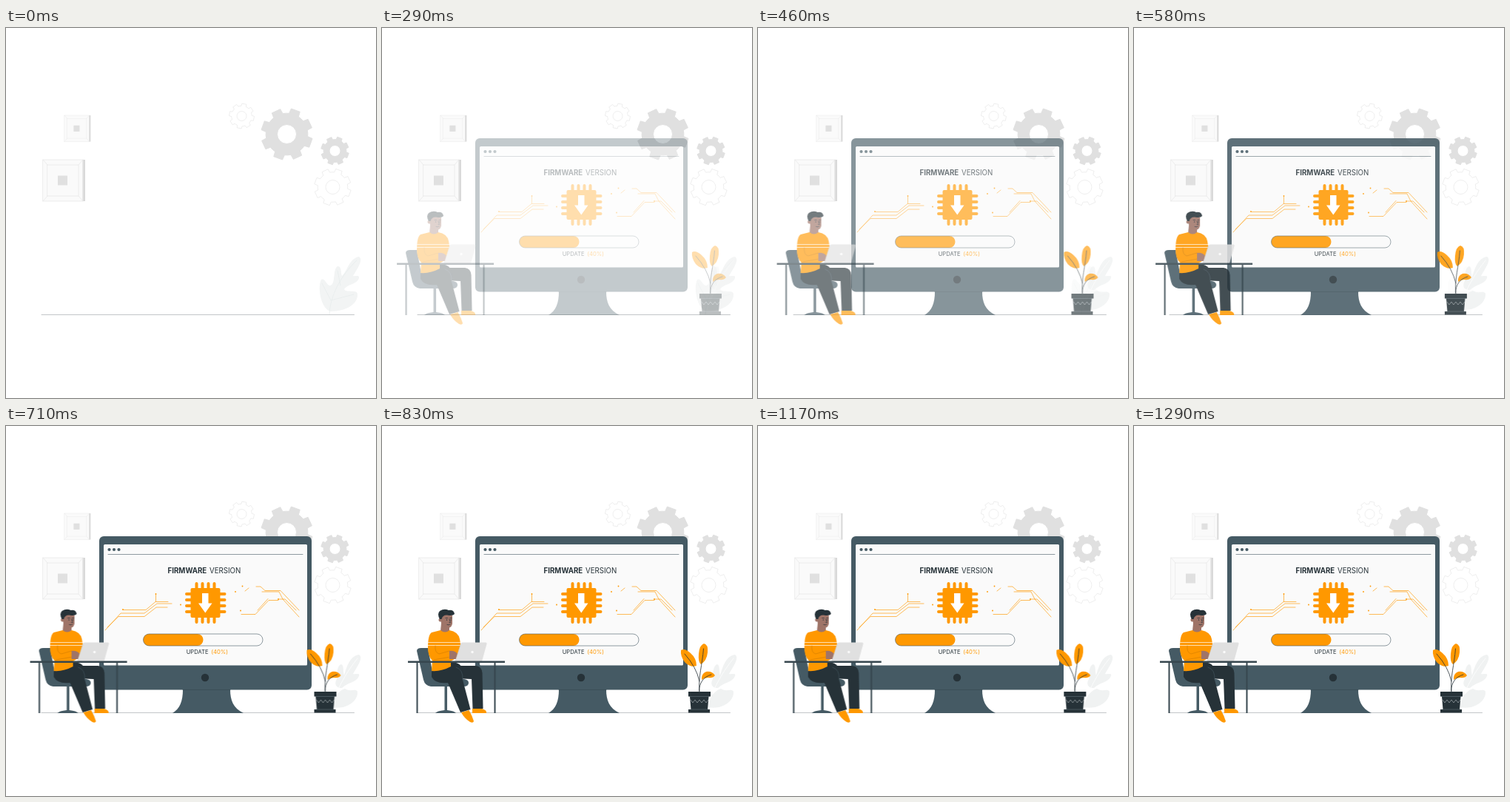
An HTML page that plays this animation: 500x500 px, repeating every 1.33 s.

```html
<!DOCTYPE html>
<html lang="en">
<head>
<meta charset="utf-8">
<title>Firmware update</title>
<style>
  html, body { margin: 0; width: 100%; height: 100%; overflow: hidden; background: #fff; }
  svg { display: block; width: 100%; height: 100%; }
  text { font-family: Inter, sans-serif; fill: #263238; }

  .fade { animation: fade 1330ms linear infinite; }
  .out { animation: fade 1330ms linear infinite, out 1330ms linear infinite; }
  .slide { animation: fade 1330ms linear infinite, slide 1330ms linear infinite; }
  .man { --side: 1px; }
  .plant { --side: -1px; }

  @keyframes fade {
    0%, 9.2% { opacity: 0; }
    49%, 100% { opacity: 1; }
  }
  @keyframes out {
    0%, 9.2% { opacity: 1; }
    49%, 100% { opacity: 0; }
  }
  @keyframes slide {
    0%, 9.4% {
      transform: translateX(calc(var(--side) * -20));
      animation-timing-function: cubic-bezier(.33, .38, .67, .93);
    }
    75% {
      transform: translateX(calc(var(--side) * 2));
      animation-timing-function: ease-in-out;
    }
    97%, 100% { transform: none; }
  }

  .line { fill: none; stroke-linecap: round; stroke-linejoin: round; }
  .dark { fill: #263238; }
  .slate { fill: #455a64; }
  .orange { fill: #ff9800; }
  .skin { fill: #9f7468; }
</style>
</head>
<body>
<svg viewBox="0 0 500 500">
  <defs>
    <g id="frame">
      <path fill="#fafafa" d="M0 0H54V56H0Z"/>
      <path fill="#d9d9d9" d="M53.5 0H57V56H53.5Z"/>
      <path class="line" stroke="#e9e9e9" stroke-width=".8"
        d="M0 0H54V56H0ZM6 7H48V49H6ZM0 0L6 7M54 0L48 7M0 56L6 49M54 56L48 49"/>
      <path fill="#e0e0e0" d="M20 21.5H33V34.5H20Z"/>
    </g>
  </defs>

  <!-- wall and floor -->
  <use href="#frame" transform="translate(50 178)"/>
  <use href="#frame" transform="translate(79 118) scale(.62 .635)"/>
  <g id="gears"></g>
  <g class="out">
    <path fill="#f2f4f4" d="M438 383C424 377 421 348 426 340C431 337 433 348 438 348C446 347 441 326 448 322C454 321 452 331 454 335C461 329 464 311 477 309C483 313 476 323 469 335C472 336 478 333 477 338C474 347 463 345 457 353C459 358 474 353 475 359C476 371 463 383 438 383Z"/>
    <path class="line" stroke="#e6ebeb" stroke-width=".7" d="M437 387C438 362 452 335 474 314M448 328L452 348M427 345L439 368M439 368L470 360"/>
  </g>
  <g class="fade" fill="#f0f2f2">
    <path d="M457 337C460 327 464 311 477 309C483 313 476 323 469 335C472 336 479 333 477 338C473 347 462 346 454 354C446 355 443 348 447 342C447 332 448 323 453 322C457 323 455 331 457 337Z"/>
    <path d="M440 380C440 369 450 357 458 355C466 360 472 354 475 359C476 371 461 384 440 380Z"/>
    <path class="line" stroke="#fff" stroke-width=".7" d="M439 382C445 360 458 335 475 314"/>
  </g>
  <path class="line" stroke="#b4b8ba" stroke-width=".8" d="M48 387.5H470.5"/>

  <!-- monitor -->
  <g class="fade">
    <path class="slate" d="M239 356C239 372 235 382 225 388H321C307 381 303 371 303 356Z"/>
    <rect class="slate" x="126" y="149" width="287" height="207.5" rx="6"/>
    <path class="line" stroke="#37474f" stroke-width=".6" d="M239 356.5H303"/>
    <rect x="132" y="160" width="275" height="163.5" rx="1.5" fill="#fafafa"/>
    <g class="slate">
      <circle cx="139.5" cy="167" r="2.1"/>
      <circle cx="146" cy="167" r="2.1"/>
      <circle cx="152.5" cy="167" r="2.1"/>
    </g>
    <path class="line" stroke="#455a64" stroke-width=".6" d="M138 173.5H401"/>
    <circle class="dark" cx="269" cy="340" r="5.2"/>

    <text x="218.6" y="199" font-size="9.7" font-weight="700">FIRMWARE</text>
    <text x="275" y="199" font-size="9.7">VERSION</text>
    <text x="243.7" y="308" font-size="7.6">UPDATE</text>
    <text x="277.3" y="308" font-size="7.6" style="fill:#ff9800">(40%)</text>

    <!-- chip -->
    <path class="line" stroke="#ff9800" stroke-width="4"
      d="M257.5 213V265M265.5 213V265M273.5 213V265M281.5 213V265M244 227H295.500M244 235H295.500M244 243H295.500M244 251H295.500"/>
    <rect class="orange" x="249.5" y="219" width="40" height="40" rx="2"/>
    <path fill="#fff" d="M265 226H273.500V239.500H278.500L269.300 252.500L260 239.500H265Z"/>

    <!-- circuits -->
    <g class="line" stroke="#ff9800" stroke-width=".65">
      <path d="M158 248.500H189L202 237.500H219M202.500 227V237M134 276L155 253H187L204 240H224M137 272L152 257.500H187L203 245H218"/>
      <path d="M338 217H344L350 222.500H371L396 249M323 223L328 219M346 224H369L374 234L396 258M318 254.500H337L355 235.500H368M340 249L354 233.500M368 234H377L392 249"/>
    </g>
    <g class="orange">
      <circle cx="158" cy="248" r=".9"/>
      <circle cx="202.500" cy="227" r=".9"/>
      <circle cx="236" cy="241.500" r=".9"/>
      <circle cx="319.500" cy="216.500" r=".9"/>
      <circle cx="310" cy="224" r=".9"/>
      <circle cx="317" cy="249.500" r=".9"/>
      <circle cx="368" cy="234" r=".9"/>
    </g>

    <!-- progress -->
    <rect class="orange" x="185.500" y="281" width="81" height="16" rx="8"/>
    <rect x="185.500" y="281" width="161.500" height="16" rx="8" fill="none" stroke="#455a64" stroke-width=".6"/>
  </g>

  <!-- man at the desk -->
  <g class="slide man">
    <path class="slate" d="M47 304Q47 300 53 300H62L70 342H111Q117 343 117 347Q117 352 110 352H66Q58 351 56 343Z"/>
    <path class="slate" d="M84.500 351H88V384Q98 385 100 388H72Q74 385 84.500 384Z"/>

    <path class="orange" d="M122 382H135Q142 384 141 388H122Z"/>
    <path class="dark" d="M92 324L127 324Q135 325 135.500 334L136.500 382H122.500L121 342L98 341Z"/>
    <path class="orange" d="M107 387L117.500 384Q122 392 124 399Q123 402 119 400Q111 395 107 387Z"/>
    <path class="dark" d="M67 333Q69 321 84 320H100Q112 323 109 343L119.500 383L106 387L89 347Q72 349 67 339Z"/>
    <path class="line" stroke="#455a64" stroke-width=".6" d="M100 326Q110 329 109 343"/>

    <path class="skin" d="M80 267H91V277Q85 283 79 277Z"/>
    <path class="orange" d="M79 276Q85 281 91 276Q103 278 105 288L108 306L101 313L93 318V325Q80 332 67 331L68 317Q62 311 62 300Q62 282 67 279Z"/>
    <path class="line" stroke="#fff" stroke-width=".7" d="M62.500 292.500H106M62 296.500H106.500"/>
    <path class="line" stroke="#d17d00" stroke-width=".6" d="M72 297Q71 306 77 308L91 304M92 312L70 316"/>
    <path class="skin" d="M91 304Q98 303 102 308L100 315H91Z"/>

    <path class="skin" d="M79 256Q86 252 95 256L95 267Q94 273 89 272.500Q82 272 80 267Z"/>
    <circle class="skin" cx="79" cy="262" r="2.500"/>
    <path class="dark" d="M78 261Q74 254 78 250Q84 246 90 249Q97 248 98 254Q96 257 88 255.500Q82 255 80.500 261Z"/>
    <g class="line" stroke="#263238" stroke-width=".7">
      <path d="M86 259.500H88.500M92 259.500H94M88 268.500Q90.500 269.500 92 268M91 261L92.500 265.500H91"/>
    </g>
    <circle class="dark" cx="87.500" cy="262" r=".7"/>
    <circle class="dark" cx="93" cy="262" r=".7"/>

    <path fill="#e0e0e0" d="M108.500 292.500H140Q142 292.500 141.500 294.500L135 318H99L106.500 294Q107 292.500 108.500 292.500Z"/>
    <path class="line" stroke="#cfcfcf" stroke-width=".6" d="M106.500 294L99 318"/>
    <circle cx="122" cy="305.500" r="1.700" fill="#fafafa"/>
    <path fill="#37474f" d="M35 317.500H166V320H35ZM46.500 320H48.500V388H46.500ZM151.500 320H153.500V388H151.500Z"/>
  </g>

  <!-- potted plant -->
  <g class="slide plant">
    <path class="orange" d="M404 303Q409 300 417 307Q425 314 425 324Q417 327 409 319Q403 311 404 303Z"/>
    <path class="orange" d="M435 294Q441 295 440 306Q439 317 431 322Q427 319 428 308Q429 296 435 294Z"/>
    <path class="orange" d="M432 343Q431 335 438 332Q446 331 450 337Q447 341 441 340Q436 340 432 343Z"/>
    <path class="line" stroke="#263238" stroke-width=".8"
      d="M429 359C427 340 433 322 434.500 301M429 345Q425 326 409 308M428.500 358C429 347 434 339 445 336"/>
    <path class="dark" d="M414 359H444V365.500H441.500L440 383H443V387.500H414V383H417.500L416 365.500H414Z"/>
    <path class="line" stroke="#607078" stroke-width=".6" d="M416 365.500H442M417 383H440.500"/>
    <path class="line" stroke="#b5bec2" stroke-width=".6" d="M417 370L420 374L423 370L426 374L429 370L432 374L435 370L438 374L441 370"/>
  </g>
</svg>
<script>
  const gears = document.getElementById('gears');

  function gear(cx, cy, size, hole, turn, style) {
    const at = (r, a) => `${(cx + r * Math.cos(a)).toFixed(2)} ${(cy + r * Math.sin(a)).toFixed(2)}`;
    const root = size * 0.81;
    let d = '';
    for (let i = 0; i < 8; i++) {
      const a = turn + i * Math.PI / 4;
      d += `${i ? `A${root} ${root} 0 0 1 ` : 'M'}${at(root, a - 0.24)}`;
      d += `L${at(size, a - 0.18)}L${at(size, a + 0.18)}L${at(root, a + 0.24)}`;
    }
    d += `A${root} ${root} 0 0 1 ${at(root, turn - 0.24)}Z`;
    d += `M${at(hole, 0)}A${hole} ${hole} 0 1 0 ${at(hole, Math.PI)}A${hole} ${hole} 0 1 0 ${at(hole, 0)}Z`;
    const path = document.createElementNS('http://www.w3.org/2000/svg', 'path');
    path.setAttribute('d', d);
    path.setAttribute('fill-rule', 'evenodd');
    for (const key in style) path.setAttribute(key, style[key]);
    gears.append(path);
  }

  const solid = { fill: '#e0e0e0', stroke: '#e0e0e0', 'stroke-width': 1, 'stroke-linejoin': 'round' };
  const outline = { fill: '#fff', stroke: '#e2e2e2', 'stroke-width': 0.6, 'stroke-linejoin': 'round' };
  gear(379.5, 143.5, 35, 13, 0.35, solid);
  gear(444.5, 166, 19, 7.5, 0.35, solid);
  gear(441.5, 215, 25, 9.5, 0.35, outline);
  gear(318.5, 119, 17, 6.5, 0.2, outline);
</script>
</body>
</html>
```
